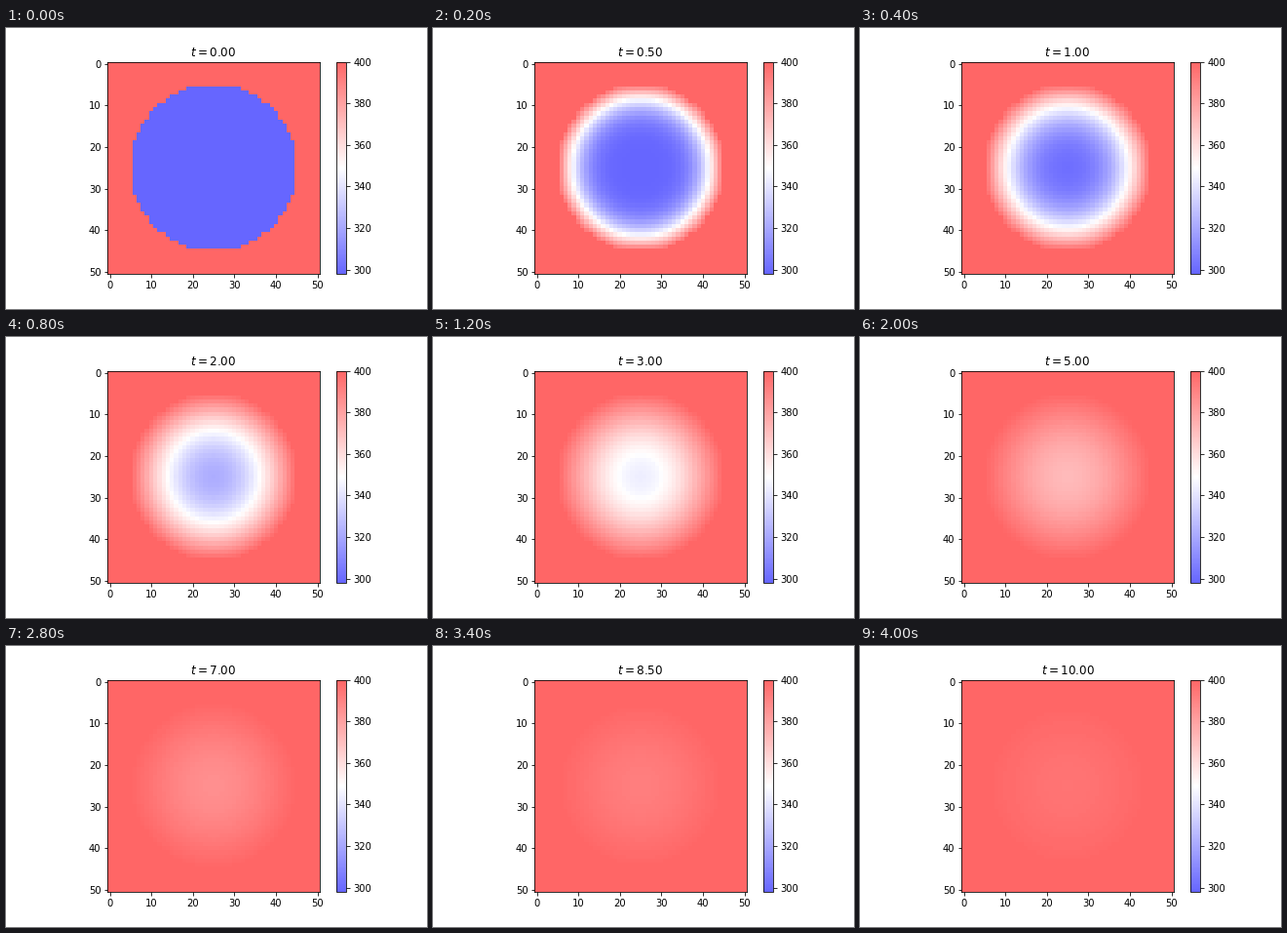
A matplotlib script that plays this animation: 432 by 288 pixels, repeating every 4200 ms.

```python
import numpy as np
import matplotlib.pyplot as plt
from matplotlib.animation import FuncAnimation

# Heat flows into a cold disc whose surroundings stay at a fixed temperature.
T_COLD, T_HOT = 298, 400
SIZE, RADIUS = 51, 20
DIFFUSIVITY, DX, DT = 1.0, 0.2, 0.01
FRAMES, INTERVAL, STEPS = 21, 200, 50

rows, cols = np.indices((SIZE, SIZE)) - SIZE // 2
disc = rows**2 + cols**2 < RADIUS**2


def step(u):
    neighbours = (np.roll(u, 1, 0) + np.roll(u, -1, 0)
                  + np.roll(u, 1, 1) + np.roll(u, -1, 1))
    change = DIFFUSIVITY * DT / DX**2 * (neighbours - 4 * u)
    return np.where(disc, u + change, T_HOT)


def simulate():
    u = np.where(disc, float(T_COLD), float(T_HOT))
    states = [u]
    for _ in range(FRAMES - 1):
        for _ in range(STEPS):
            u = step(u)
        states.append(u)
    return states


states = simulate()

fig, ax = plt.subplots(figsize=(6, 4), dpi=72)
fig.subplots_adjust(left=0.125, right=0.9, bottom=0.125, top=0.88)
image = ax.imshow(states[0], cmap="bwr", vmin=T_COLD, vmax=T_HOT,
                  alpha=0.6, interpolation="nearest")
fig.colorbar(image, ax=ax)
title = ax.set_title("")


def update(frame):
    image.set_data(states[frame])
    title.set_text(f"$t={frame * STEPS * DT:.2f}$")
    return image, title


anim = FuncAnimation(fig, update, frames=FRAMES, interval=INTERVAL,
                     repeat=True, repeat_delay=0)
plt.show()
```
